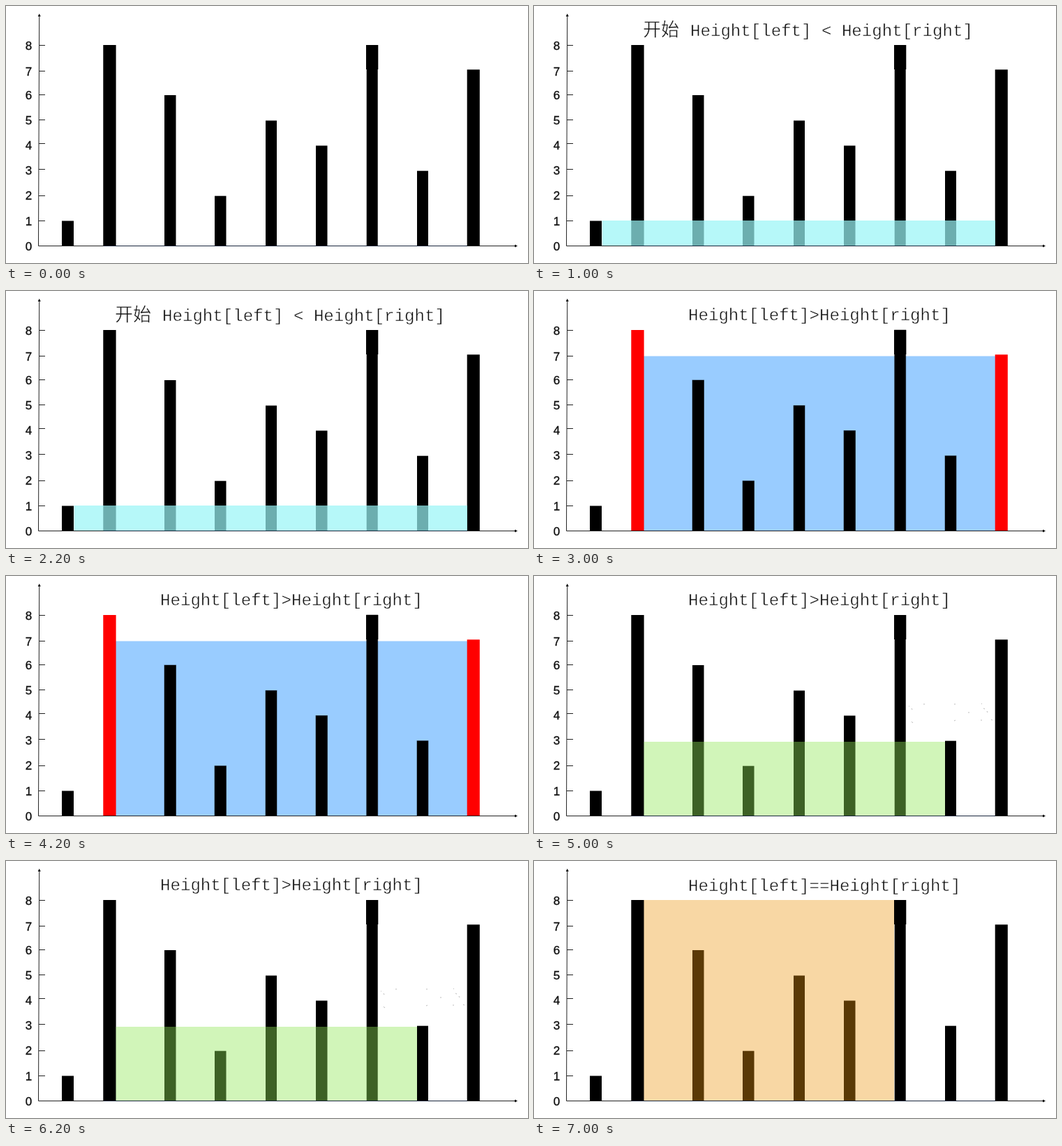
An HTML page for the animation above (8000 ms loop, 748x369 px).

```html
<!DOCTYPE html>
<html lang="zh">
<head>
<meta charset="utf-8">
<title>Two pointers</title>
<style>
  html, body { margin: 0; width: 100%; height: 100%; overflow: hidden; background: #fff; }
  svg { display: block; width: 748px; height: 369px; }
  .label { font: 17px "Liberation Sans", Arial, sans-serif; text-anchor: middle; fill: #111; stroke: #111; stroke-width: .35; }
  /* The white outline thins the strokes of the letters. */
  .caption { font: 24.1px "Liberation Mono", monospace; fill: #111; stroke: #fff; stroke-width: .5; white-space: pre; }
  .han { font: 300 26px "Noto Sans CJK SC", sans-serif; fill: #111; stroke: #fff; stroke-width: .5; }
  .axis { stroke: #222; fill: none; }
</style>
</head>
<body>
<svg viewBox="0 0 748 369">
  <rect id="backdrop" fill="#9cf"/>
  <g id="bars"></g>
  <path id="notch" d="M516 56H533.3V91H516z"/>
  <rect id="water"/>
  <g id="axes">
    <path class="axis" d="M47.7 14L46.5 344.5H730"/>
    <path d="M47.7 11l2 4h-4zM733 344.5l-4-2v4z"/>
  </g>
  <path id="baseline" d="M140 344.5H661" stroke="#18263c"/>
  <path id="specks" stroke="#aaa" stroke-width=".8"
    d="M541 190l1 2M541 209l2 2M537 187h1M558 184h2M603 183v2M602 208l2-1M622 196h2M641 183l1 1M644 190l2 1M640 207h2M649 194l1 2M655 206l2 1"/>
  <text id="han" class="han" x="156" y="43">开始</text>
  <text id="caption" class="caption"></text>
</svg>
<script>
const byId = id => document.getElementById(id);

function set(node, attributes) {
  for (const name in attributes) node.setAttribute(name, attributes[name]);
}

function add(parent, tag, attributes, text = "") {
  const node = document.createElementNS("http://www.w3.org/2000/svg", tag);
  set(node, attributes);
  node.textContent = text;
  return parent.appendChild(node);
}

const box = (left, top, right, bottom = 344.5) =>
  ({ x: left, y: top, width: right - left, height: bottom - top });

// Vertical centre of each number and its tick, counting up from zero.
const labelY = [345, 309, 272, 236, 200, 164, 128, 94, 57];
const tickY = [0, 308.5, 272.5, 234.5, 197.5, 163.5, 127.5, 93.5, 56.5];
labelY.forEach((y, n) => {
  add(byId("axes"), "text", { class: "label", x: 32.5, y: y + 6 }, n);
  if (n) add(byId("axes"), "path", { class: "axis", d: `M47 ${tickY[n]}H56` });
});

const bars = [
  [80, 308.5, 97, 344], [139.3, 56, 157.6], [227, 128, 243.5, 344],
  [299, 272.7, 315.5, 344], [372, 164.5, 388], [444, 200.5, 460.5],
  [516.7, 56, 532.7], [589, 236.7, 605, 344], [660.7, 91.3, 678.8]
].map(edges => add(byId("bars"), "rect", box(...edges)));

const stages = [
  { start: 0 },
  { start: 1000, text: "Height[left] < Height[right]", x: 224, y: 43, han: true,
    area: box(97.5, 308, 661), fill: "rgba(153,246,247,.71)" },
  { start: 3000, text: "Height[left]>Height[right]", x: 221, y: 42,
    area: box(157, 93.5, 661), solid: true },
  { start: 5000, text: "Height[left]>Height[right]", x: 221, y: 42, specks: true,
    area: box(157.5, 238, 589), fill: "rgba(145,231,88,.42)" },
  { start: 7000, text: "Height[left]==Height[right]", x: 221, y: 43,
    area: box(157.5, 56, 516), fill: "rgba(237,151,18,.38)" }
];

const show = (id, visible) => byId(id).style.display = visible ? "" : "none";

function draw({ text = "", x = 0, y = 0, area, fill, solid, han, specks }) {
  byId("caption").textContent = text;
  set(byId("caption"), { x, y });
  show("han", han);
  show("specks", specks);
  show("backdrop", solid);
  show("water", area && !solid);
  show("baseline", !solid);
  if (area) set(byId(solid ? "backdrop" : "water"), area);
  if (fill) set(byId("water"), { fill });
  bars.forEach((bar, i) => {
    const chosen = solid && (i === 1 || i === 8);
    set(bar, {
      fill: chosen ? "#f00" : "#000",
      stroke: solid && !chosen && i ? "rgba(0,0,0,.5)" : "none"
    });
  });
}

const origin = performance.now();
let current;

function tick() {
  const time = (performance.now() - origin) % 8000;
  const stage = stages.findLast(s => s.start <= time);
  if (stage !== current) draw(current = stage);
  requestAnimationFrame(tick);
}
tick();
</script>
</body>
</html>
```
